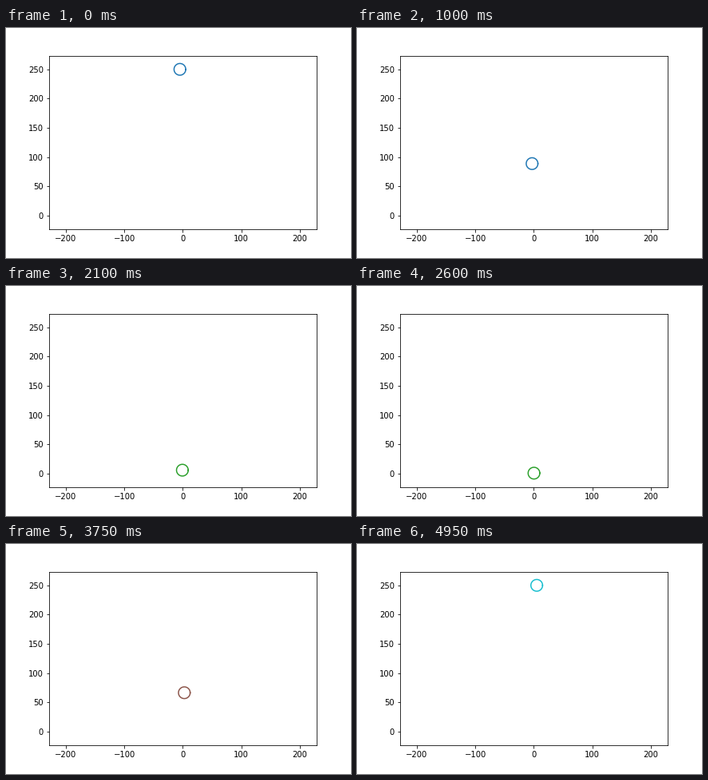
Animation, 432 px wide and 288 px high, one loop 5000 ms. Source, as a matplotlib script:

```python
import numpy as np
import matplotlib.pyplot as plt
from matplotlib.animation import FuncAnimation

FRAMES = 100
INTERVAL = 50
RADIUS = 10

fig, ax = plt.subplots(figsize=(6, 4), dpi=72)
fig.subplots_adjust(left=0.125, right=0.9, bottom=0.125, top=0.88)

theta = np.linspace(0, 2 * np.pi, 100)
circle_x = RADIUS * np.cos(theta)
circle_y = RADIUS * np.sin(theta)

# The circle's centre follows the parabola y = 10 x^2
centre_x = np.linspace(-5, 5, FRAMES)
centre_y = 10 * centre_x ** 2

# Equal scales on both axes, with a 5 % margin above and below the path
low = centre_y.min() - RADIUS
high = centre_y.max() + RADIUS
margin = 0.05 * (high - low)
ax.set_ylim(low - margin, high + margin)
box = ax.get_window_extent()
half_width = (high - low + 2 * margin) * box.width / box.height / 2
ax.set_xlim(-half_width, half_width)
ax.set_xticks(range(-200, 201, 100))
ax.set_yticks(range(0, 251, 50))

line, = ax.plot([], [], lw=1.5)


def update(i):
    line.set_data(centre_x[i] + circle_x, centre_y[i] + circle_y)
    line.set_color(f"C{i % 10}")
    return line,


anim = FuncAnimation(fig, update, frames=FRAMES, interval=INTERVAL,
                     repeat=True, repeat_delay=0)
plt.show()
```
